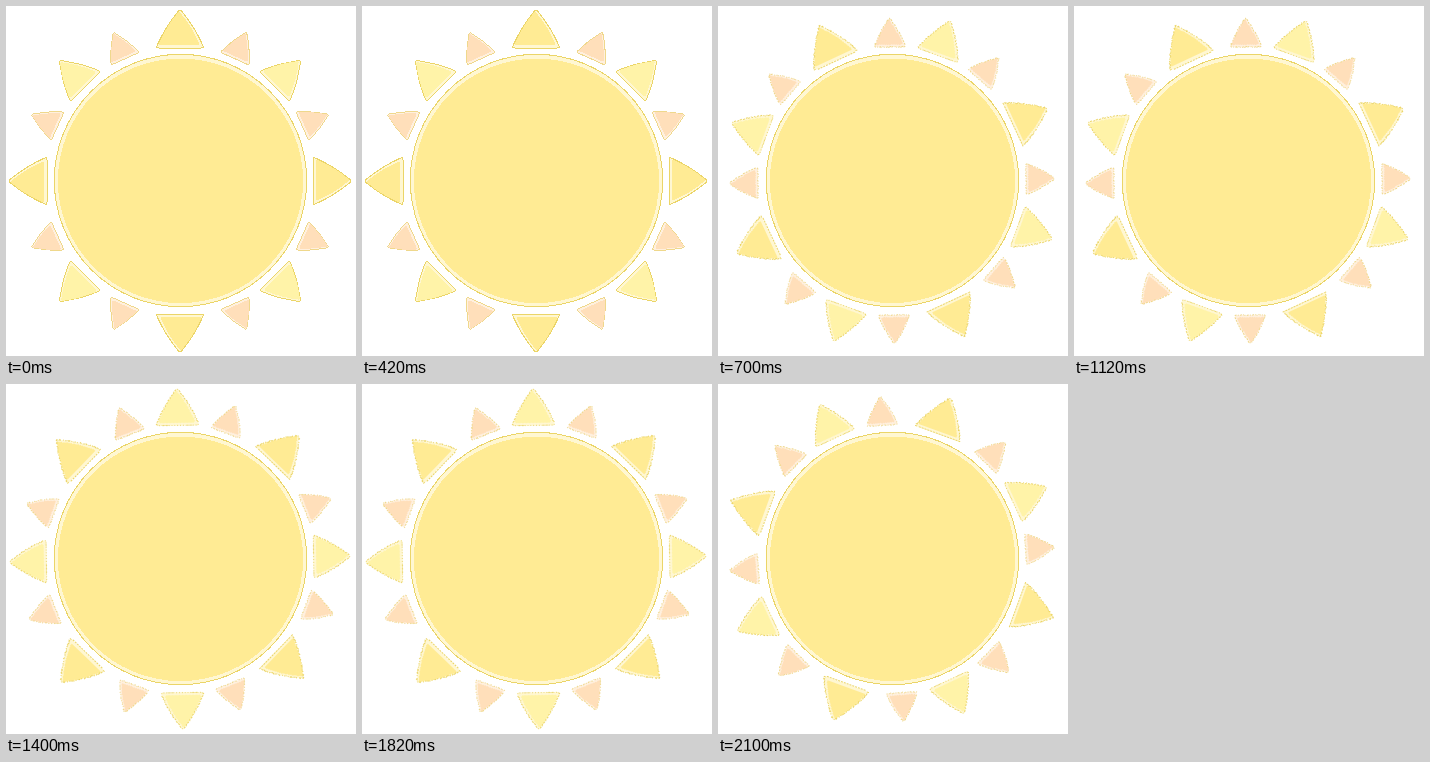
Write an HTML page that moves like this. It is 350 px wide and 350 px high and loops after 2800 ms.

```html
<!DOCTYPE html>
<html lang="en">
<head>
<meta charset="utf-8">
<title>Turning sun</title>
<style>
  html, body { margin: 0; width: 100%; height: 100%; overflow: hidden; background: #fff; }
  svg { display: block; width: 100vw; height: 100vh; shape-rendering: crispEdges; }
  #rays { transform-origin: 174px 175px; }
  .edge { fill: #fff7d2; stroke: #ebd568; stroke-width: 1; }
  .peach .edge { fill: #fff0de; stroke: #efd88c; }
  .gold .body { fill: #ffeb94; }
  .lemon .body { fill: #fff3a8; }
  .peach .body { fill: #ffdfba; }
</style>
</head>
<body>
<svg viewBox="0 0 350 350">
  <g id="rays"></g>
  <g class="gold">
    <circle class="edge" cx="174.5" cy="174.5" r="126.2"/>
    <ellipse class="body" cx="174.5" cy="174.8" rx="122.6" ry="122.3"/>
  </g>
</svg>
<script>
const NS = 'http://www.w3.org/2000/svg';
const rays = document.getElementById('rays');

// Distances from the sun's centre, and half the width of the base.
const gold = { name: 'gold', base: 133, tip: 172.5, half: 24.5 };
const lemon = { name: 'lemon', base: 133.5, tip: 171.5, half: 22 };
const peach = { name: 'peach', base: 134, tip: 163.5, half: 16 };
const order = [gold, peach, lemon, peach];
const count = 16;

function add(parent, tag, attrs) {
  const el = document.createElementNS(NS, tag);
  for (const key in attrs) el.setAttribute(key, attrs[key]);
  return parent.appendChild(el);
}

const mix = (a, b, t) => a.map((v, i) => v + (b[i] - v) * t);

// Upright triangle with soft corners, bulging sides and a flat base.
function triangle({ base, tip, half }) {
  const pts = [[0, -tip], [half, -base], [-half, -base]];
  const mid = [0, -(tip + 2 * base) / 3];
  const soft = 0.07;
  const sides = pts.map((p, i) => {
    const q = pts[(i + 1) % 3], next = pts[(i + 2) % 3];
    const ctrl = mix(mid, mix(p, q, 0.5), i === 1 ? 1 : 1.2);
    return `Q${ctrl} ${mix(p, q, 1 - soft)}Q${q} ${mix(q, next, soft)}`;
  });
  return `M${mix(pts[0], pts[1], soft)}${sides.join('')}Z`;
}

for (let i = 0; i < count; i++) {
  const kind = order[i % order.length];
  const lean = 1.6 * Math.sin(i * Math.PI / 2);
  const angle = i * 360 / count + lean;
  const group = add(rays, 'g', {
    class: kind.name,
    transform: `translate(174 175) rotate(${angle})`
  });
  const d = triangle(kind);
  // The body shrinks away from the base and the clockwise side, leaving a pale rim.
  const x = -0.3 * kind.half, y = -(kind.base + 0.6 * (kind.tip - kind.base));
  add(group, 'path', { class: 'edge', d });
  add(group, 'path', {
    class: 'body', d,
    transform: `translate(${x} ${y}) scale(0.87) translate(${-x} ${-y})`
  });
}

// Turned poses carry a dotted outline.
const poses = [0, -25, -46, -70];
const frames = poses.map((deg, i) => ({
  offset: i / poses.length,
  easing: 'step-end',
  transform: `rotate(${deg}deg)`,
  strokeDasharray: deg ? '2px 1px' : 'none'
}));
frames.push({ ...frames[poses.length - 1], offset: 1 });
rays.animate(frames, { duration: 2800, iterations: Infinity });
</script>
</body>
</html>
```
